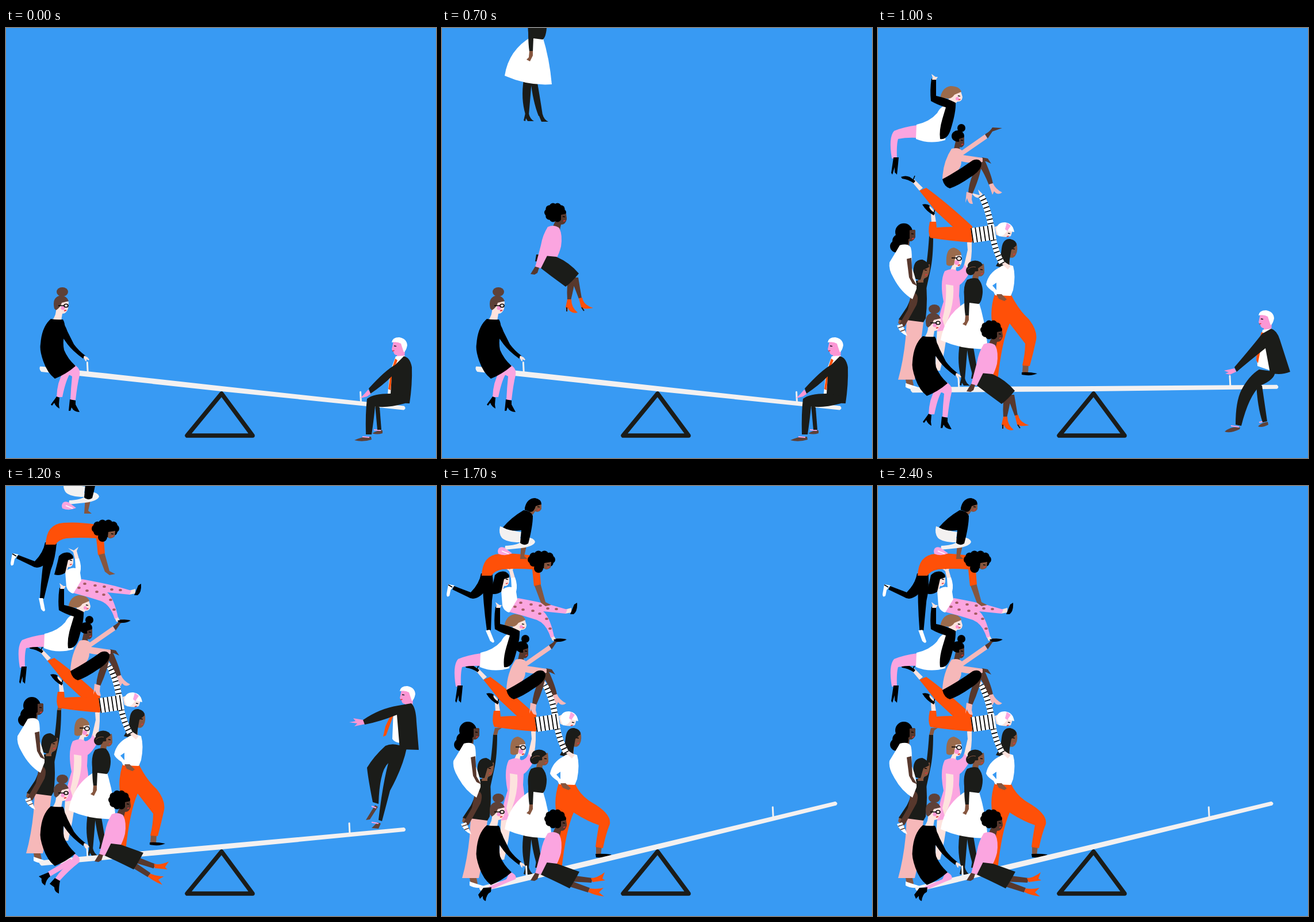
An HTML page for the animation above (5400 ms loop, 748 by 748 pixels).

```html
<!DOCTYPE html>
<html lang="en">
<head>
<meta charset="utf-8">
<title>Seesaw</title>
<style>
html,body{margin:0;width:100%;height:100%;overflow:hidden;background:#389af3}
svg{display:block;width:100vw;height:100vh}
</style>
</head>
<body>
<svg id="stage" viewBox="0 0 748 748"></svg>
<script>
const ink = '#1b1c19', black = '#000', white = '#fff', cream = '#f3f1f1', orange = '#ff5008',
  pink = '#fba5e0', blush = '#f6b8b9', pale = '#fde3de', dark = '#57382d', mid = '#86563f',
  umber = '#5e4138', tan = '#9b6b4c', rose = '#fb97d4', red = '#e0353a';

// drawing helpers
const f = (c, d) => `<path fill="${c}" d="${d}"/>`;
const l = (c, w, d, dash = '') =>
  `<path fill="none" stroke="${c}" stroke-width="${w}" d="${d}" ${dash && `stroke-dasharray="${dash}"`}/>`;
const o = (c, x, y, rx, ry = rx) => `<ellipse fill="${c}" cx="${x}" cy="${y}" rx="${rx}" ry="${ry}"/>`;
const down = (y, art) => `<g transform="translate(0 ${y})">${art}</g>`;
const poses = (...list) => `<g class="poses">${list.map(a => `<g>${a}</g>`).join('')}</g>`;
const face = (x, y, mx, my) => l(black, 1.3, `M${x} ${y}l4 .6`) + l(red, 1.8, `M${mx} ${my}l3.5 -1`);
const curls = (x, y, rx, ry, r) => {
  let s = o(black, x, y, rx, ry);
  for (let i = 0; i < 10; i++) {
    const a = i * Math.PI / 5;
    s += o(black, x + rx * Math.cos(a), y + ry * Math.sin(a), r);
  }
  return s;
};

const bun =
  down(84,
    o(umber, 98, 459, 10, 8) +
    f(pale, 'M92 474L109 476L108 488Q105 497 98 497L96 509L80 509Q88 499 87 488Z') +
    f(umber, 'M84 488Q80 470 92 466Q105 464 109 475L97 478Q95 486 87 491Z') +
    o(rose, 99, 487, 3.5) + l(red, 2, 'M101 492l4 -1') +
    l(black, 1.6, 'M91 483H101M101 483a3.5 2.8 0 1 0 7 0a3.5 2.8 0 1 0 -7 0')) +
  poses(
    down(84,
      f(pink, 'M105 592L112 600Q104 612 98 642L88 642Q89 615 100 598Z') +
      f(black, 'M88 641L93 643L92 655L93 662Q86 658 84 652L80 657L78 655L86 644Z') +
      f(pink, 'M119 586Q130 592 128 604Q124 620 121 647L112 647Q113 625 115 606L104 600Z') +
      f(black, 'M111 646L121 648L121 655L128 668Q118 668 114 660L112 666L109 666Z')),
    down(33,
      f(pink, 'M112 648L118 655L77 679L73 671Z') +
      f(black, 'M74 672L77 679Q70 684 68 695Q60 690 62 683L57 679Z') +
      f(pink, 'M119 640Q131 645 127 655Q110 668 93 687L86 682Q98 664 112 656Z') +
      f(black, 'M85 682L94 687Q92 695 92 709Q84 706 84 698L76 692Z')),
    f(pink, 'M118 671Q131 676 128 684Q110 691 88 701L81 697L112 684Z') +
    f(black, 'M72 699L86 698L85 706Q77 710 76 722Q70 720 71 713L66 718L63 711Z')) +
  down(84,
    f(black, 'M78 506Q88 508 99 507Q104 515 102 530Q98 545 101 560Q107 575 121 588Q105 602 85 610Q72 600 65 580Q58 560 60 550Q62 520 78 506Z') +
    f(black, 'M96 510Q103 516 107 528L118 550Q126 561 138 570L134 575Q116 562 107 550L97 536Z') +
    f(pale, 'M136 570l6 3l3 4l-2 1l-3 -2v4l-2 -1l-3 -6z'));

const curly =
  down(258,
    f(dark, 'M204 322L215 322L217 332Q215 342 207 342L205 351L191 350L196 338Z') + face(209, 328, 210, 336) +
    curls(197, 321, 12.5, 10.5, 6.5) +
    f(dark, 'M207 325L216 323L217 332Q215 342 207 341Z') + face(210, 328, 211, 336) +
    f(pink, 'M184 346Q195 341 204 348Q210 360 207 380Q204 392 199 401L174 400Z')) +
  poses(
    down(258,
      f(dark, 'M218 446L232 432Q230 450 224 474L218 474Q217 460 218 446ZM230 434L237 434L243 470L238 471Q232 455 228 445Z') +
      f(orange, 'M218 472l7 0Q225 486 236 495Q224 498 219 487L218 494L215 486ZM238 470l6 -1Q246 482 263 487Q248 490 242 486Z') +
      l(ink, 2, 'M217 486v7M243 486l4 6') +
      f(ink, 'M178 396L199 398Q222 408 238 427Q226 442 215 450Q190 432 167 414Z')),
    '<g id="shins">' +
      f(dark, 'M232 678L262 682L260 690L222 688ZM222 686L257 699L254 707L216 695Z') +
      f(orange, 'M259 682Q270 682 283 672L279 683L284 686L262 689ZM257 700Q270 702 281 699L273 707L282 714Q265 712 254 706Z') +
    '</g>' + f(ink, 'M175 654L200 657L239 671Q230 688 222 700Q190 684 165 673Z')) +
  down(258,
    f(ink, 'M164 394l6 0l-3 12l-5 0z') +
    f(pink, 'M184 346Q175 360 172 378L162 416L172 418L183 396L190 360Z') +
    f(dark, 'M162 415l7 2l-3 9l-5 3l-7 -1z'));

const skirt = down(52,
  f(ink, 'M142 552L156 552Q154 580 151 613L145 612Q137 585 142 552ZM154 552L165 552Q170 580 175 613L168 615Q158 590 154 552Z') +
  f(ink, 'M145 610l6 1Q153 620 160 624L149 624L146 619L145 624L142 623ZM168 613l7 -1Q177 621 185 625L173 625Z') +
  f(white, 'M156 477Q165 474 175 477Q187 515 191 560Q150 563 109 545Q116 500 156 477Z') +
  f(mid, 'M168 418L184 412L185 427Q183 435 175 434L174 442L163 442Z') + face(177, 422, 179, 430) +
  o(ink, 169, 416, 13, 9.5) + o(ink, 161, 424, 8) + f(mid, 'M174 420L184 413L185 427Q183 435 175 434Z') +
  face(178, 422, 179, 430) + l(mid, 1, 'M156 422q6 -6 14 -4') +
  f(ink, 'M155 440Q165 435 174 438Q185 450 181 470Q179 480 175 482L159 480L158 503L152 503Q150 490 150 470Q148 450 155 440Z') +
  f(mid, 'M152 502l6 0l0 8l-5 10l-6 -3l4 -4z'));

const rider =
  f(dark, 'M54 420L65 422L65 434Q61 442 55 441L54 452L44 450Z') +
  o(black, 45, 425, 15) + o(black, 39, 441, 14, 13) + o(black, 33, 450, 12, 11) +
  f(dark, 'M55 422L64 421L65 434Q61 442 55 441Z') + face(58, 428, 59, 437) +
  f(dark, 'M58 530Q74 530 67 552L46 590L37 586L52 560Z') +
  f(white, 'M38 448Q52 444 57 452Q60 462 58 485Q68 510 67 524L60 542Q40 530 27 505Q18 490 20 478Q28 465 38 448Z') +
  f(dark, 'M50 472L58 470L60 505L68 519L60 515L54 504Z') +
  f(white, 'M33 588l9 -3l9 21q-13 -5 -18 -18') + l(dark, 1.5, 'M35 592l9 -3M39 598l8 -3');

const bob =
  f(blush, 'M50 577L80 575Q74 620 72 640Q68 665 64 682L35 682Q44 650 48 610Z') +
  f(mid, 'M48 682L60 682L62 692L50 692Z') + f(white, 'M48 688L60 692L76 697Q60 702 48 695Z') +
  f(mid, 'M37 575l7 3l-4 8l-5 -2z') +
  f(ink, 'M66 510Q78 507 83 510Q87 540 83 575L79 582L48 578Q58 550 66 510Z') +
  f(ink, 'M67 510Q56 545 50 556L36 577L44 580L62 560Z') +
  f(ink, 'M79 510Q86 480 89 432L96 432Q96 470 91 492L84 524Z') +
  f(mid, 'M89 433l7 0l2 -8l7 -5l-13 1z') +
  f(mid, 'M75 484L90 481Q91 495 86 503L79 507V513L69 513Z') + face(81, 491, 82, 500) +
  f(ink, 'M62 500Q59 473 77 473Q88 477 89 486L79 491L74 508Q62 509 62 500Z');

const specs =
  f(pale, 'M103 576L121 576Q116 620 108 650L100 650Q100 620 103 576Z') +
  f(pale, 'M149 470L156 440L155 427L163 424L163 442Q162 465 156 480Z') +
  f(pale, 'M130 450L145 449L146 460Q144 471 136 470L135 479L124 479L130 466Z') +
  f(tan, 'M119 465Q117 437 132 436Q145 440 145 449L135 450L132 466Q122 470 119 465Z') +
  o(rose, 137, 462, 4) + l(red, 2, 'M139 467l4 -1') +
  l(black, 1.6, 'M128 454H137M137 455a4 3.5 0 1 0 8 0a4 3.5 0 1 0 -8 0') +
  f(pink, 'M116 477Q130 470 138 477Q148 475 150 465L160 478Q150 496 142 501L141 520Q145 545 145 575L103 582Q104 560 114 530Q107 495 116 477Z') +
  f(pale, 'M118 500L131 502Q133 530 122 560L116 574L112 560Q120 530 118 500Z');

const backLeg = 'L229 568Q215 600 208 668L198 668Q205 620 199 570Q194 545 203 517Z';
const strider =
  poses(
    f(mid, 'M252 638l10 1l-1 17l-10 0z') + f(black, 'M250 653Q263 652 277 655Q267 660 250 657Z') +
    f(orange, 'M203 517L231 517Q245 545 262 560Q278 580 275 597Q270 620 264 642L251 641Q256 620 256 603' + backLeg),
    f(mid, 'M268 626l10 1l-2 16l-8 0z') + f(black, 'M267 640Q280 639 295 641Q285 648 268 646Z') +
    f(orange, 'M203 517L231 517Q240 538 260 550Q295 570 292 588Q285 605 280 630L267 628Q270 605 273 590Q250 582 229 568' + backLeg)) +
  f(mid, 'M226 432L241 428Q244 440 240 448Q236 456 229 453V466L220 466Z') + face(234, 438, 235, 448) +
  f(ink, 'M205 468Q214 455 215 438Q217 420 230 421Q242 424 241 432L232 440L227 468Q215 472 205 468Z') +
  f(white, 'M212 470Q222 462 235 468Q240 485 235 510L231 520L204 519L201 513Q190 506 188 500Q192 480 212 470Z') +
  f('#389af3', 'M206 497L199 502L206 510Z') + f(mid, 'M206 517l9 0l9 9l-4 3l-10 -4z');

const torso = 'M163 415L204 409', armUp = 'M197 402Q193 372 180 346', armLow = 'M199 415Q205 445 216 464';
const stripy =
  f(pale, 'M48 313L64 318L78 332L72 337L62 325ZM80 362Q92 361 98 373L101 392L93 392L92 376ZM176 349L182 343L174 335L177 345L163 341Q169 351 176 349ZM213 462L219 460L231 468L226 474Z') +
  f(black, 'M40 313Q48 310 55 313L65 320L62 324Q52 317 42 316ZM77 361Q85 359 90 363Q87 368 99 376L97 380Q84 373 77 361Z') +
  l(black, 1.5, 'M64 311l-4 10M101 364l-4 12') +
  f(orange, 'M72 337L84 332Q120 358 164 399L164 426L156 424Q130 400 100 372Z') +
  f(orange, 'M90 391L101 391L102 401Q135 398 164 403L163 427Q130 425 91 419Q86 410 90 391Z') +
  [[armUp, 10.5], [armLow, 10], [torso, 26]].map(([d, w]) => l(white, w, d) + l(black, w, d, '1.8 5.4')).join('') +
  f(pale, 'M203 400L214 396L234 407L231 416Q220 420 206 414Z') +
  f(white, 'M206 405Q207 392 221 392Q235 394 237 409L225 406Q218 418 210 416Z') +
  f(pink, 'M224 393L231 398L225 407L221 404Z') + face(226, 411, 224, 417);

const sitter =
  f(dark, 'M168 340L181 326Q178 350 164 381L157 380Q158 360 168 340ZM180 321L187 325Q198 350 200 363L193 365Q185 345 178 335Z') +
  f(blush, 'M154 377L164 380L163 390L165 398Q157 399 155 388L152 396ZM193 364L200 362Q204 372 216 378Q208 384 202 376L199 382Z') +
  f(dark, 'M137 280L150 283L150 294Q147 301 142 299L143 307L131 307Z') + face(144, 287, 145, 295) +
  o(black, 145, 266, 7) + o(black, 139, 280, 11, 10) +
  f(dark, 'M141 285L150 282V294Q147 301 142 299Z') + face(144, 287, 145, 295) +
  f(dark, 'M186 277Q195 272 199 265L216 266L199 272L191 284ZM181 317l10 2l6 9l-9 -4l-7 1z') +
  f(blush, 'M128 302Q140 299 146 305L186 277L190 284L148 313L182 318V325Q160 328 145 324Q145 345 112 355Q113 325 128 302Z') +
  f(black, 'M112 355Q140 340 165 322Q178 318 180 328Q180 340 160 352Q140 366 125 371Q115 368 112 355Z');

const reacher =
  f(pink, 'M68 291Q45 294 28 301Q18 312 24 349L33 349Q32 325 35 315Q50 312 68 313Z') +
  f(black, 'M27 347L36 347L35 358L33 377L29 373L29 364L25 377L23 374Z') +
  f(pale, 'M124 238L144 232L147 242Q146 251 138 250L132 256L122 252Z') + o(rose, 138, 245, 3) + face(139, 240, 140, 247) +
  f(tan, 'M108 246Q110 226 126 223Q142 223 145 233L133 238Q127 247 118 244Q112 248 108 246Z') +
  f(white, 'M67 290Q90 285 103 270Q110 256 122 256L117 317Q90 325 66 315Z') +
  f(black, 'M135 252Q136 268 126 300Q120 317 108 315Q106 300 112 280L118 260Q104 256 92 249Q90 230 93 210L101 211L101 240Q120 244 135 252Z') +
  f(pale, 'M94 212l7 0l3 -5l-4 0l-7 -5l2 6z');

const spots = [[127, 210], [137, 203], [141, 215], [155, 206], [158, 217], [171, 208], [170, 222], [184, 213], [182, 231], [188, 248], [199, 214]];
const dotty =
  f(pale, 'M214 215l11 -3v8l-11 2zM189 262l6 -1l4 8l-7 0zM120 161L127 160L123 146L126 139L118 145L108 141L117 148Z') +
  f(black, 'M223 223L230 206L235 203Q236 218 229 223ZM194 267Q206 264 217 267Q207 273 196 270Z') +
  f(pink, 'M117 219Q125 200 132 195Q165 201 190 207L218 215L215 222L176 218Q188 228 195 262L189 264Q182 240 165 233Q140 225 117 219Z') +
  spots.map(([x, y]) => o('#a65b62', x, y, 2.8, 2)).join('') +
  f(pale, 'M104 158L117 156V167Q115 175 108 174L105 184L100 182Z') + face(111, 162, 111, 170) +
  f(white, 'M103 182Q112 174 121 176L120 160L127 159Q132 172 129 184L131 197L117 220Q108 218 105 208Z') +
  f(black, 'M84 187Q90 165 92 155Q100 147 110 149Q118 153 117 159L108 162L103 184Q94 190 84 187Z');

const bridge =
  f(white, 'M11 171L22 173L15 181L13 191Q8 195 8 188Z') + l(black, 1.5, 'M11 172l7 4') +
  f(black, 'M68 152L88 152Q85 175 68 190Q55 200 45 193L18 180L21 174L50 185Q65 170 68 152Z') +
  '<g id="kick">' +
    f(black, 'M70 153L88 153Q86 180 78 200L66 250L59 249Q62 200 70 153Z') +
    f(white, 'M57 249L64 249L68 270Q66 275 61 268Z') + '</g>' +
  f(mid, 'M160 171L171 169L180 202L190 207L180 209L172 203Z') +
  f(orange, 'M69 156Q70 120 100 118Q125 116 157 121L170 146L172 171L160 174L157 145Q130 143 105 145Q92 147 86 156Z') +
  curls(173, 128, 17, 9, 7) + o(black, 168, 143, 8) +
  f(mid, 'M178 134L190 132L189 142Q182 148 177 143Z') + face(183, 137, 183, 142);

const crown =
  f(mid, 'M138 98L148 100L143 122L149 127L136 127ZM160 32L173 32V40Q169 47 162 44L158 50L150 46Z') + face(166, 36, 166, 42) +
  f(black, 'M144 38Q148 21 162 21Q173 23 173 32L163 35Q160 46 153 45Q147 42 144 42Z') +
  f(cream, 'M101 70Q120 78 138 80L136 91Q158 86 162 97Q160 105 138 108L109 111L110 104Q130 103 136 98Q112 98 104 90Q98 82 101 70Z') +
  f(pink, 'M97 114Q98 104 108 107L122 117Q110 123 98 118Z') + l(white, 1.5, 'M104 113l12 5') +
  f(black, 'M106 72Q120 55 142 42Q155 43 158 52Q158 70 150 100Q142 105 136 99L138 77Q120 80 106 72Z');

const head = (dx, dy, turn = 0) => `<g transform="translate(${dx} ${dy}) rotate(${turn} 686 556)">` +
  f(rose, 'M674 545L690 546L694 562L693 573L680 572V569Q675 569 674 563L671 559Z') +
  f(white, 'M671 547Q672 538 684 538Q697 540 698 552Q696 562 692 564L687 549Q680 545 671 547Z') +
  face(675, 553, 672, 562) + '</g>';
const man = [
  head(0, 0) +
  f(umber, 'M637 705Q648 699 655 700V705Q645 708 637 705ZM606 717Q620 710 635 711L636 716Q620 721 606 717Z') +
  l(pink, 2, 'M640 699l12 1M620 711l12 1') +
  f(ink, 'M642 655L650 660L653 699L646 699Z') +
  f(rose, 'M630 629L635 636L628 641L616 644L624 636Z') +
  f(white, 'M678 571L694 570L680 600L674 640L664 636L668 598Z') +
  f(orange, 'M677 575L681 578L672 600L669 630L665 628L669 600Z') +
  f(ink, 'M692 571Q703 573 706 590Q707 620 702 653L668 652L671 606Q655 622 634 636L631 627Q660 595 677 586Z') +
  f(ink, 'M694 653Q660 662 642 658Q640 680 636 707L626 707Q625 670 628 645Q640 635 675 636L692 640Z'),

  head(-9, -47) +
  f(umber, 'M603 702Q615 692 630 695L629 698Q612 706 603 702ZM661 693Q668 686 678 685L679 690Q668 696 661 693Z') +
  l(pink, 2, 'M614 692l14 2M663 686l10 -2') +
  f(ink, 'M658 618L668 622L677 684L669 686Q660 660 658 618Z') +
  f(rose, 'M620 592L623 598L612 603L604 601L610 599L602 596Z') +
  f(white, 'M669 525L685 523L686 597L660 588Q657 560 668 530Z') +
  f(orange, 'M667 529l5 2l-8 36l-3 16l-3 -5l2 -24z') +
  f(ink, 'M684 523Q694 526 699 542L717 598Q700 605 682 600L674 557Q645 580 624 598L620 590Q650 555 668 532Z') +
  f(ink, 'M691 598Q690 612 665 622Q645 640 632 692L622 690Q622 650 632 630Q645 605 663 594Z'),

  head(14, -190) +
  f(umber, 'M642 555l5 3l-14 22l-7 1zM646 585l6 2l-4 9l-12 -1z') +
  l(pink, 2, 'M636 557l8 3M636 585l12 2') +
  f(rose, 'M622 407L625 414L606 418L611 413L597 411L608 409L604 404Z') +
  f(white, 'M674 390L688 390L686 447Q676 446 672 440Z') +
  f(orange, 'M668 401L674 399L661 434L656 436L660 418Z') +
  f(ink, 'M682 382L705 378Q713 385 714 410L718 459L685 458L680 398Q650 410 624 415L621 407Q650 387 682 382Z') +
  f(ink, 'M660 452Q675 445 697 456Q690 490 668 530L654 583L648 581Q655 520 665 482Q650 495 648 553L638 550Q630 510 628 490Q640 470 660 452Z'),

  head(39, -274, 10) +
  f(umber, 'M549 325L553 304L558 303L557 323ZM598 471L614 466L630 466L627 472Z') +
  l(pink, 2, 'M557 312l3 6M614 461l10 4') +
  f(rose, 'M645 282V290L634 286L626 276L636 280L630 271L640 278Z') +
  f(white, 'M698 300L704 305L692 358L677 353Q685 330 698 300Z') +
  f(orange, 'M694 308L701 306L692 322L667 341L675 325Z') +
  f(ink, 'M646 281Q680 281 710 291L722 291Q733 293 732 303L715 377L690 370L701 307Q670 302 644 290Z') +
  f(ink, 'M556 323Q620 325 684 344L693 372Q650 360 557 332ZM666 358L694 370Q650 410 631 466L622 464Q630 405 666 358Z')
];

// land: step of landing; gap: height one step earlier; lever: travel with the board
const cast = [
  { id: 'bob', art: bob, land: 10, gap: 230, lever: 1.3 },
  { id: 'rider', art: rider, land: 10, gap: 230, lever: 1.3 },
  { id: 'specs', art: specs, land: 10, gap: 230 },
  { id: 'strider', art: strider, land: 10, gap: 230 },
  { id: 'skirt', art: skirt, land: 9, gap: 240 },
  { id: 'bun', art: bun, land: 0 },
  { id: 'curly', art: curly, land: 8, gap: 174 },
  { id: 'stripy', art: stripy, land: 10, gap: 230 },
  { id: 'sitter', art: sitter, land: 11, gap: 38 },
  { id: 'reacher', art: reacher, land: 11, gap: 68 },
  { id: 'dotty', art: dotty, land: 12, gap: 60 },
  { id: 'bridge', art: bridge, land: 13, gap: 21 },
  { id: 'crown', art: crown, land: 13, gap: 46 }
];

const board = '<g id="board">' + f(cream, 'M57 623Q61 622 375 623L694 623Q699 627 694 630L375 632L60 632Q55 628 57 623Z') + '</g>' +
  '<path id="pegs" stroke="#f3f1f1" stroke-width="3" stroke-linecap="round"/>' +
  '<path d="M375 636L315 709H429Z" fill="none" stroke="#1b1c19" stroke-width="7.5" stroke-linejoin="round"/>';
const group = p => `<g id="${p.id}">${p.art}</g>`;
const $ = id => document.getElementById(id);
const stage = $('stage');
stage.innerHTML = cast.slice(0, 5).map(group).join('') + board +
  `<g id="man">${poses(...man)}</g>` + cast.slice(5).map(group).join('');

// per step from 500 ms to 1300 ms
const lift = [84, 84, 84, 78, 68, 54, 44, 33, 0];
const tilt = [6.2, 6.2, 6.2, 5, 3, -.4, -3, -5.2, -13.5];
const manPose = [0, 0, 0, 0, 1, 1, 2, 2, 3];
const manDrop = [0, 0, 0, -6, 18, 0, 14, 0, 0];
const pegAt = [244, 238, 224, 207];

const move = (id, x, y) => $(id).setAttribute('transform', `translate(${x} ${y})`);
const turn = (id, a, x, y) => $(id).setAttribute('transform', `rotate(${a} ${x} ${y})`);
const pose = (id, n) => [...$(id).querySelector('.poses').children]
  .forEach((g, i) => g.style.display = i === n ? '' : 'none');

function kickAngle(step) {
  if (step < 17) return -3 * Math.max(0, step - 13);
  return -9.7 - 1.7 * Math.cos((Math.min(step, 24) - 17) / 7 * 3 * Math.PI);
}

function draw(step) {
  const i = Math.min(Math.max(step - 5, 0), 8);
  for (const { id, land, gap, lever = 1 } of cast) {
    const wait = land - step;
    const above = !land || wait <= 0 ? 0 : step < 5 ? 2000 : gap + (wait - 1) * 190;
    move(id, 0, -lift[i] * lever - above);
  }
  pose('bun', i < 7 ? 0 : i - 6);
  pose('curly', i < 7 ? 0 : 1);
  pose('strider', i < 8 ? 0 : 1);
  turn('shins', i < 8 ? 14 : 0, 225, 680);
  turn('kick', kickAngle(step), 79, 155);
  turn('board', tilt[i], 375, 627);

  const a = tilt[i] * Math.PI / 180;
  const peg = r => `M${375 + r * Math.cos(a)} ${627 + r * Math.sin(a)}l-1 -20`;
  $('pegs').setAttribute('d', peg(-234) + peg(pegAt[manPose[i]]));

  const gone = Math.max(0, step - 13);
  pose('man', manPose[i]);
  move('man', gone * 40, manDrop[i] - gone * 170);
}

let last = -1;
function tick(now) {
  const step = Math.floor(now % 5400 / 100);
  if (step !== last) draw(last = step);
  requestAnimationFrame(tick);
}
draw(0);
requestAnimationFrame(tick);
</script>
</body>
</html>
```
